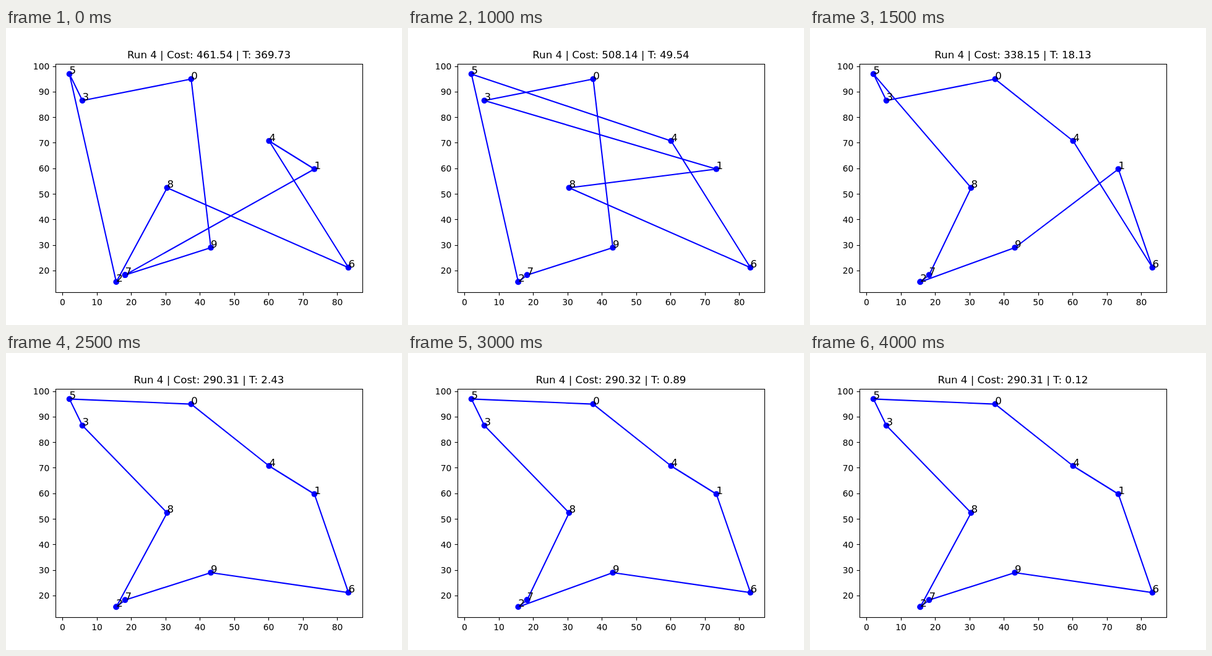
An HTML page for the animation above (4500 ms loop, 640 by 480 pixels).

```html
<!DOCTYPE html>
<html lang="en">
<head>
<meta charset="utf-8">
<title>Simulated annealing tour</title>
<style>
  html, body { margin: 0; width: 100%; height: 100%; overflow: hidden; background: #fff; }
  svg { display: block; width: 640px; height: 480px; }
  text { font-family: "DejaVu Sans", sans-serif; font-size: 16.667px; fill: #000; }
  .tick { font-size: 13.889px; }
  .mid { text-anchor: middle; }
  .end { text-anchor: end; }
  .axis { fill: none; stroke: #000; stroke-width: 1.11; }
  #tour { fill: none; stroke: #00f; stroke-width: 2.083; stroke-linejoin: round; }
  .city { fill: #00f; }
</style>
</head>
<body>
<svg id="stage" viewBox="0 0 640 480">
  <path id="tour"/>
  <g id="cities"></g>
  <circle id="start" class="city" r="4.86"/>
  <g id="axes"></g>
  <g id="labels"></g>
  <text id="title" class="mid" x="328" y="49"/>
</svg>
<script>
const STEP = 500;

// City positions in stage pixels, indexed by city number.
const cities = [
  [299.3, 82.6], [498.4, 228], [178.2, 410.4], [123.5, 117.3], [425.2, 182.5],
  [102.55, 74.4], [553.45, 387.2], [192.5, 399.2], [260.4, 258.3], [331.1, 355]
];

// Visiting order and cost after each batch of 100 iterations.
const runs = [
  ["7903528641", 461.54],
  ["7189053246", 514.07],
  ["2790318645", 508.14],
  ["2916403587", 338.15],
  ["2853041697", 298.31],
  ["2835041697", 290.31],
  ["7835041692", 290.32],
  ["2835041697", 290.31],
  ["2835041697", 290.31]
];

const $ = id => document.getElementById(id);

function add(parent, tag, attrs, text) {
  const el = document.createElementNS("http://www.w3.org/2000/svg", tag);
  for (const key in attrs) el.setAttribute(key, attrs[key]);
  if (text !== undefined) el.textContent = text;
  $(parent).appendChild(el);
}

const snap = v => Math.floor(v) + 0.5;

function drawAxes() {
  add("axes", "rect", { class: "axis", x: 80.5, y: 58.5, width: 496, height: 369 });
  for (let v = 0; v <= 80; v += 10) {
    const x = 91.5 + v * 5.55;
    add("axes", "path", { class: "axis", d: `M${snap(x)} 427.5v4.86` });
    add("axes", "text", { class: "tick mid", x, y: 448 }, v);
  }
  for (let v = 20; v <= 100; v += 10) {
    const y = 392.4 - (v - 20) * 4.13;
    add("axes", "path", { class: "axis", d: `M80.5 ${snap(y)}h-4.86` });
    add("axes", "text", { class: "tick end", x: 70.3, y: Math.round(y + 5) }, v);
  }
}

function drawCities() {
  cities.forEach(([x, y], i) => {
    add("cities", "circle", { class: "city", cx: x, cy: y, r: 4.86 });
    add("labels", "text", { x, y: Math.round(y) }, i);
  });
}

function render(time) {
  const k = Math.floor(time / STEP) % runs.length;
  const [order, cost] = runs[k];
  const points = [...order].map(c => cities[c]);
  const temp = 1000 * 0.99 ** (99 + 100 * k);
  $("tour").setAttribute("d", "M" + points.map(p => p.join(" ")).join("L") + "Z");
  $("start").setAttribute("cx", points[0][0]);
  $("start").setAttribute("cy", points[0][1]);
  $("title").textContent = `Run 4 | Cost: ${cost.toFixed(2)} | T: ${temp.toFixed(2)}`;
}

drawAxes();
drawCities();
render(0);

const begin = performance.now();
function tick() {
  render(performance.now() - begin);
  requestAnimationFrame(tick);
}
requestAnimationFrame(tick);
</script>
</body>
</html>
```
